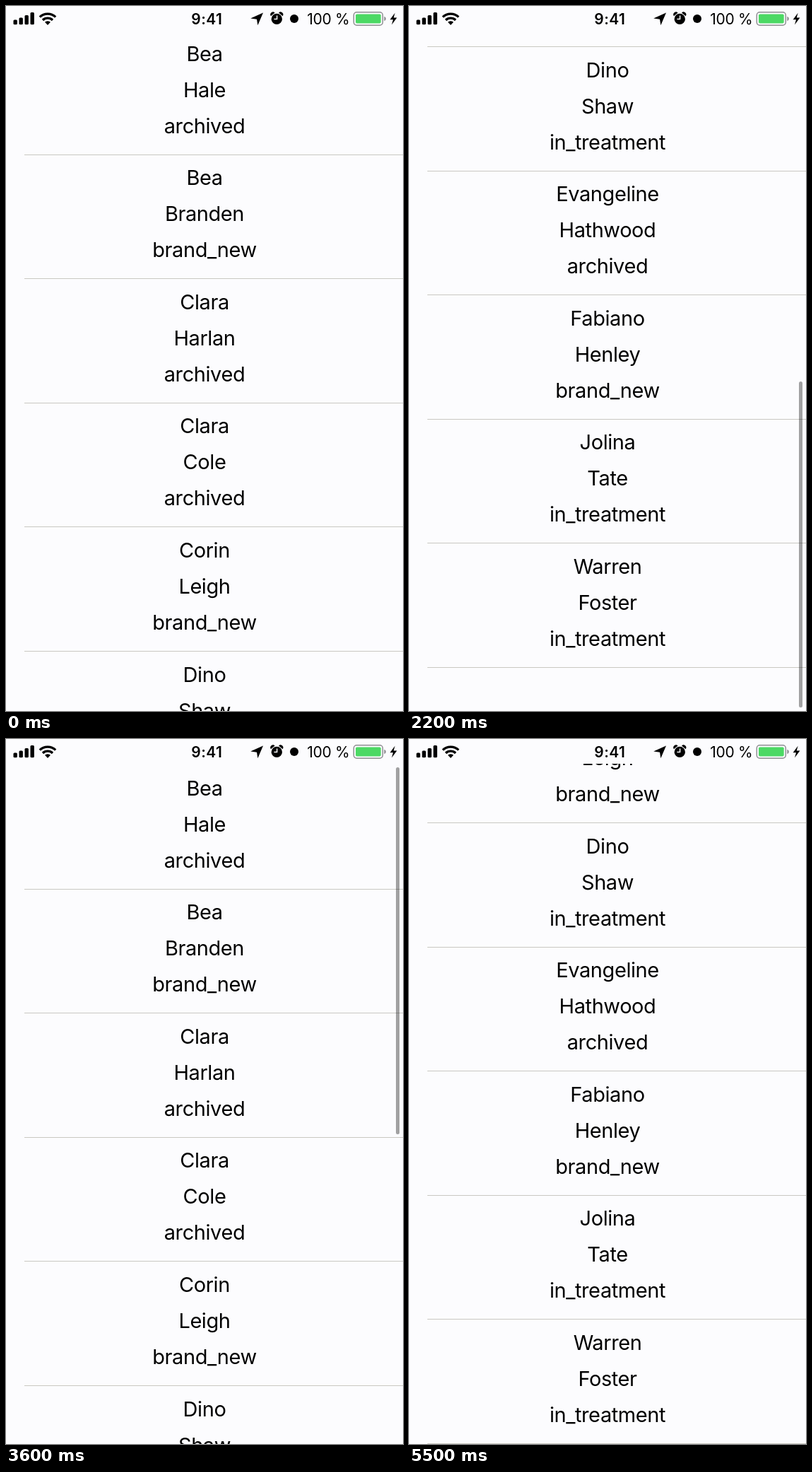
Write an HTML page that moves like this. It is 562x997 px and loops after 5.8 s.

```html
<!DOCTYPE html>
<html lang="en">
<head>
<meta charset="utf-8">
<title>Contact list</title>
<style>
  html, body { margin: 0; width: 100%; height: 100%; overflow: hidden; background: #fcfcfe; }
  body { position: relative; color: #000; font-family: Inter, Roboto, "Liberation Sans", sans-serif; }
  #status { position: absolute; left: 0; top: 0; width: 562px; height: 35px; }
  #status text { font-size: 21px; }
  #view { position: absolute; left: 0; top: 35px; width: 562px; height: 962px; overflow: hidden; }
  #list { position: absolute; left: 0; top: 0; width: 562px; will-change: transform; }
  .row { position: absolute; left: 0; width: 562px; height: 175px; padding-top: 7px; box-sizing: border-box;
         text-align: center; font-size: 29px; line-height: 51px; letter-spacing: -.42px; white-space: nowrap; }
  .row::after { content: ""; position: absolute; left: 26px; right: 0; top: 175px; height: 1px; background: #c9c8c2; }
  #bar { position: absolute; left: 552px; width: 5px; border-radius: 2.5px; background: rgba(0, 0, 0, .36); opacity: 0; }
</style>
</head>
<body>
<div id="view"><div id="list"></div></div>

<svg id="status" viewBox="0 0 562 35">
  <!-- signal -->
  <rect x="10.5" y="19.5" width="5.4" height="6.8" rx="1.5"/>
  <rect x="18.5" y="16.5" width="5.4" height="9.8" rx="1.5"/>
  <rect x="26.5" y="13" width="5.4" height="13.3" rx="1.5"/>
  <rect x="34.5" y="9" width="5.4" height="17.3" rx="1.5"/>
  <!-- wifi -->
  <g fill="none" stroke="#000" stroke-width="3.3">
    <path d="M47.8 15.6A16 16 0 0 1 70.2 15.6"/>
    <path d="M52 20A10 10 0 0 1 66 20"/>
  </g>
  <path d="M59 27l-4-4.2a5.8 5.8 0 0 1 8 0z"/>
  <text x="284.3" y="25.6" text-anchor="middle" font-weight="600" letter-spacing=".4">9:41</text>
  <!-- location -->
  <path d="M364 9.5L356.4 27.2 355 18.8 346.2 17.6z"/>
  <!-- alarm -->
  <circle cx="383.3" cy="18.4" r="7.7"/>
  <path d="M375 14.2a3.7 3.7 0 0 1 5.6-4.8zM391.6 14.2a3.7 3.7 0 0 0-5.6-4.8z"/>
  <path d="M383.6 13.6v5h-4.2" fill="none" stroke="#fcfcfe" stroke-width="1.5"/>
  <circle cx="408" cy="18" r="6"/>
  <text x="486.3" y="25.6" text-anchor="end" letter-spacing="-.3">100 %</text>
  <!-- battery -->
  <rect x="492.3" y="8.8" width="41" height="18.4" rx="4.2" fill="none" stroke="#8e8e92" stroke-width="1.5"/>
  <rect x="495" y="11.4" width="35.7" height="13.2" rx="1.8" fill="#4cd964"/>
  <path d="M535.3 14.8q2.6 1 2.6 3.2t-2.6 3.2z" fill="#8e8e92"/>
  <path d="M550.6 9.8l-7 9.4h4.4l-2 7.4 7.4-10h-4.6z"/>
</svg>
<div id="bar"></div>

<script>
  const LOOP = 5800, STEP = 100;
  const ROW = 175.6, VIEW = 962, MAX = 794;
  const TRACK_TOP = 40, TRACK = 952;
  const SPRING = 0.0109;

  const people = [
    "Bea Hale archived", "Bea Branden brand_new", "Clara Harlan archived", "Clara Cole archived",
    "Corin Leigh brand_new", "Dino Shaw in_treatment", "Evangeline Hathwood archived",
    "Fabiano Henley brand_new", "Jolina Tate in_treatment", "Warren Foster in_treatment"
  ];

  // Each flick runs to an overshoot, then springs back to the list's edge.
  const flicks = [
    { start: 950,  from: 0,   top: 1200, peak: -215, rest: 0 },
    { start: 1700, from: -6,  top: 2200, peak: 855,  rest: MAX },
    { start: 2715, from: 796, top: 3100, peak: -77,  rest: 0 },
    { start: 3650, from: -2,  top: 4050, peak: 874,  rest: MAX }
  ];

  const list = document.getElementById("list");
  const bar = document.getElementById("bar");
  const clamp = (v, lo, hi) => Math.min(hi, Math.max(lo, v));

  people.forEach((person, i) => {
    const row = document.createElement("div");
    row.className = "row";
    row.style.top = Math.floor(i * ROW) + "px";
    for (const word of person.split(" ")) {
      const line = document.createElement("div");
      line.textContent = word;
      row.append(line);
    }
    list.append(row);
  });

  function offsetAt(t) {
    const f = flicks.filter(k => k.start <= t).pop();
    if (!f) return 0;
    if (t < f.top) {
      const p = (t - f.start) / (f.top - f.start);
      return f.from + (f.peak - f.from) * Math.sin(p * Math.PI / 2);
    }
    const s = SPRING * (t - f.top);
    return f.rest + (f.peak - f.rest) * Math.exp(-s) * (1 + s);
  }

  function draw(t) {
    const y = offsetAt(t);
    const inside = clamp(y, 0, MAX);
    const full = TRACK * VIEW / (ROW * people.length);
    const size = full - Math.abs(y - inside);
    list.style.transform = `translateY(${-Math.round(y)}px)`;
    bar.style.height = size + "px";
    bar.style.top = TRACK_TOP + (TRACK - size) * inside / MAX + "px";
    bar.style.opacity = t < 1000 ? 0 : clamp((4900 - t) / 200, 0, 1);
  }

  function tick() {
    const t = performance.now() % LOOP;
    draw(Math.floor(t / STEP) * STEP);
    requestAnimationFrame(tick);
  }
  tick();
</script>
</body>
</html>
```
